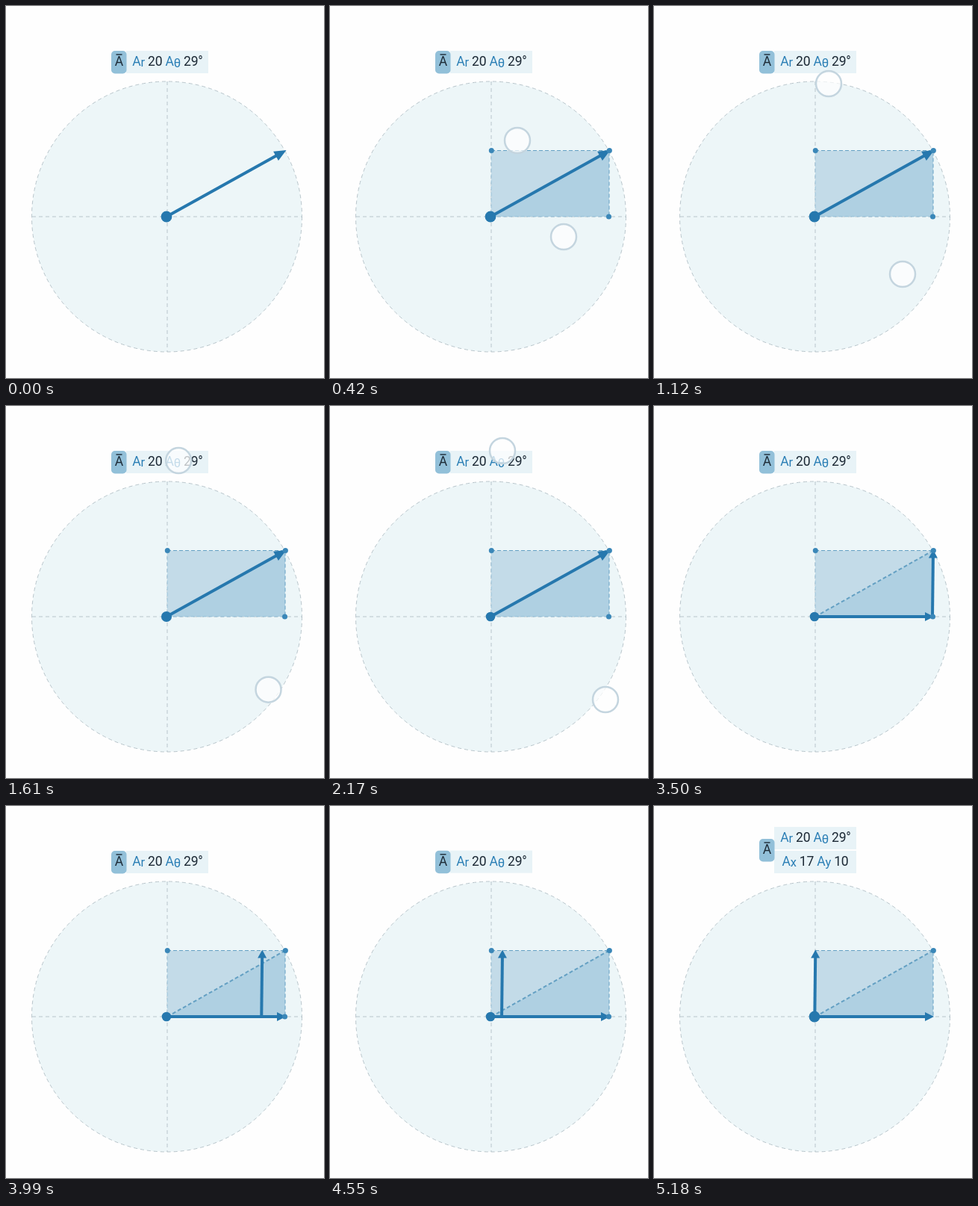
An HTML page that plays this animation: 426 by 498 pixels, repeating every 5.25 s.

```html
<!DOCTYPE html>
<html lang="en">
<head>
<meta charset="utf-8">
<title>Vector components</title>
<style>
  html, body { margin: 0; width: 100%; height: 100%; overflow: hidden; background: #fefefe; }
  svg { display: block; width: 100%; height: 100%; }
  text { font: 17.5px Roboto, Arial, sans-serif; letter-spacing: -.2px; text-anchor: middle; fill: #1c2935; }
  .sub { font-size: 16.5px; }
  .name { fill: #2a7eb5; }
  .row { fill: #e8f3f7; }
  .guide { fill: none; stroke: #b8c5cb; stroke-dasharray: 5 4; }
  .edge { fill: none; stroke: #64a0c3; stroke-dasharray: 5 3; }
  .dot { fill: #3a87b8; }
  .touch { fill: #fff; fill-opacity: .72; stroke: #c4d5df; stroke-width: 2.5; }
  .arrow line { stroke: #2678ae; stroke-width: 4; }
  .arrow path { fill: #2678ae; }
</style>
</head>
<body>
<svg viewBox="0 0 426 498">
  <circle cx="215.5" cy="282" r="181" fill="#edf6f8"/>
  <g class="guide">
    <circle cx="215.5" cy="282" r="181"/>
    <path d="M216 101V463M35 282H396"/>
  </g>

  <g id="area">
    <path d="M216 282V193.5H374Z" fill="#c3dbe8"/>
    <path d="M216 282H374V193.5Z" fill="#afd0e2"/>
    <path class="edge" d="M216 193.5H374V282"/>
    <path class="edge" d="M216 193.5V282H374" opacity=".5"/>
  </g>
  <path id="diagonal" class="edge" d="M216 282L374 193.5" stroke-width="2"/>

  <g id="vector" class="arrow"><line/><path/></g>
  <g id="across" class="arrow"><line/><path/></g>
  <g id="up" class="arrow"><line/><path/></g>

  <g id="corner" class="dot"><circle cx="374.3" cy="193.5" r="3.6"/></g>
  <g id="ends" class="dot">
    <circle cx="216.3" cy="193.5" r="3.5"/>
    <circle cx="373.5" cy="282" r="3.5"/>
  </g>
  <circle id="origin" cx="215" cy="282" fill="#2678ae"/>

  <g id="cartesian">
    <rect class="row" x="161" y="60" width="110" height="30"/>
    <text x="216" y="80"><tspan class="name">A<tspan class="sub" dy="1">x</tspan></tspan><tspan dy="-1"> 17 </tspan><tspan class="name">A<tspan class="sub" dy="1">y</tspan></tspan><tspan dy="-1"> 10</tspan></text>
  </g>
  <g id="polar">
    <rect class="row" x="161" y="60" width="110" height="30"/>
    <text x="216.5" y="80"><tspan class="name">A<tspan class="sub" dy="1">r</tspan></tspan><tspan dy="-1"> 20 </tspan><tspan class="name">A<tspan class="sub" dy="2">θ</tspan></tspan><tspan dy="-2"> 29°</tspan></text>
  </g>
  <g id="chip">
    <rect x="141" y="60" width="20.5" height="30.5" rx="5" fill="#92c0d9"/>
    <text x="151.3" y="80">A</text>
    <path d="M147.5 65H155.5" stroke="#1c2935" stroke-width="1.4"/>
  </g>

  <g id="touches">
    <circle id="upper" class="touch" r="17"/>
    <circle id="lower" class="touch" r="17"/>
  </g>
</svg>
<script>
  const LOOP = 5250, STEP = 70;
  const $ = id => document.getElementById(id);
  const set = (el, attrs) => { for (const k in attrs) el.setAttribute(k, attrs[k]); };
  const fade = (id, opacity) => $(id).setAttribute('opacity', opacity);
  const shift = (id, y) => $(id).setAttribute('transform', `translate(0 ${y})`);
  const mix = (a, b, u) => a + (b - a) * u;
  const ramp = (t, from, to) => Math.min(1, Math.max(0, (t - from) / (to - from)));
  const ease = (t, from, to) => { const u = ramp(t, from, to); return u * u * (3 - 2 * u); };

  // Keys are [time, x, y]; finite-difference tangents keep the drag smooth.
  const upperKeys = [[420, 251, 180], [1120, 234, 104], [1680, 231, 70], [2170, 231, 60], [2450, 231, 57]];
  const lowerKeys = [[420, 313, 309], [1120, 333, 359], [1680, 354, 382], [2170, 369, 393], [2450, 369, 393]];

  function along(keys, t) {
    const last = keys.length - 1;
    t = Math.min(keys[last][0], Math.max(keys[0][0], t));
    let i = 0;
    while (i < last - 1 && t > keys[i + 1][0]) i++;
    const a = keys[i], b = keys[i + 1], span = b[0] - a[0], u = (t - a[0]) / span;
    const slope = (k, axis) => {
      if (k === 0 || k === last) return 0;
      const p = keys[k - 1], n = keys[k + 1];
      return (n[axis] - p[axis]) / (n[0] - p[0]) * span;
    };
    return [1, 2].map(axis =>
      mix(a[axis], b[axis], u * u * (3 - 2 * u)) +
      slope(i, axis) * u * (1 - u) ** 2 - slope(i + 1, axis) * u * u * (1 - u));
  }

  function drawArrow(id, x1, y1, x2, y2, length, half) {
    const [line, head] = $(id).children;
    const size = Math.hypot(x2 - x1, y2 - y1) || 1;
    const dx = (x2 - x1) / size, dy = (y2 - y1) / size;
    const bx = x2 - dx * length, by = y2 - dy * length;
    set(line, { x1, y1, x2: bx + dx, y2: by + dy });
    set(head, { d: `M${x2} ${y2}L${bx - dy * half} ${by + dx * half}L${bx + dy * half} ${by - dx * half}Z` });
  }

  function placeTouch(id, keys, t) {
    const [cx, cy] = along(keys, t);
    set($(id), { cx, cy });
  }

  function render(t) {
    const shown = ramp(t, 70, 350);
    fade('area', shown);
    fade('corner', shown);
    fade('ends', shown * (1 - ramp(t, 4620, 4830)));

    fade('touches', ramp(t, 210, 420) * (1 - ramp(t, 2380, 2590)));
    placeTouch('upper', upperKeys, t);
    placeTouch('lower', lowerKeys, t);

    const pressed = ease(t, 1400, 1960) - ease(t, 4520, 4970);
    set($('origin'), { r: mix(7.4, 6.3, pressed) });

    const split = ramp(t, 2960, 3360);
    fade('vector', 1 - split);
    fade('diagonal', split);
    drawArrow('vector', 215, 282, 375.5, 193, 16, 7);

    const grow = ease(t, 2400, 2870);
    const x = mix(374, 216.3, ease(t, 3690, 4750));
    fade('across', ramp(t, 2400, 2520));
    fade('up', ramp(t, 2400, 2520));
    drawArrow('across', 215, 282, mix(230, 375, grow), 282, 12, 6);
    drawArrow('up', x - 1, 282, x, mix(268, 192.5, grow), 11, 6);

    const open = ease(t, 4520, 4970);
    shift('polar', -32 * open);
    shift('chip', -16 * open);
    fade('cartesian', ramp(t, 4520, 4800));
  }

  const start = performance.now();
  function tick() {
    const t = (performance.now() - start) % LOOP;
    render(Math.floor(t / STEP) * STEP);
    requestAnimationFrame(tick);
  }
  tick();
</script>
</body>
</html>
```
